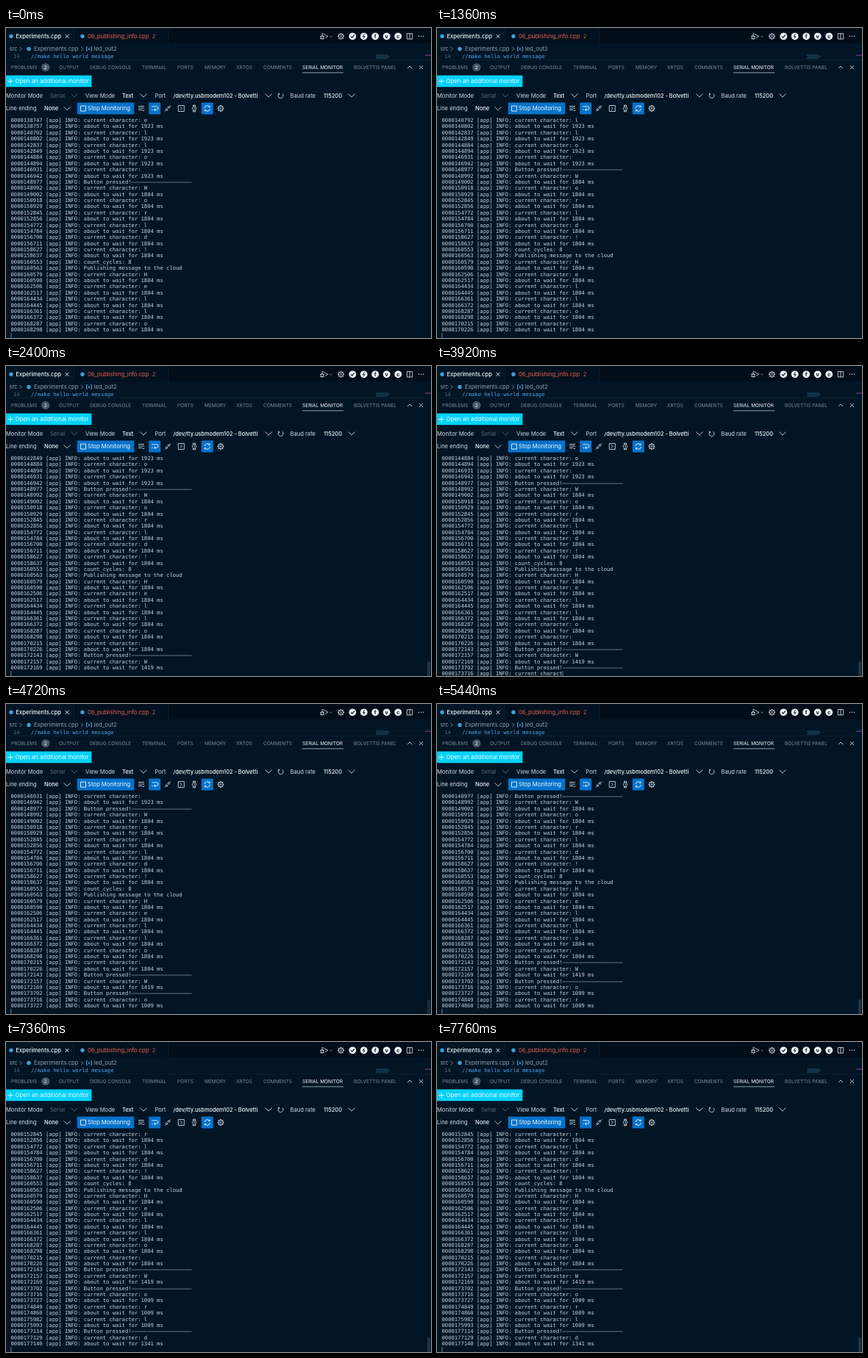
These frames come from a looping animation (578x422 px, 8000 ms). An HTML page with a canvas:

```html
<!DOCTYPE html>
<html lang="en">
<head>
<meta charset="utf-8">
<title>Serial monitor</title>
<style>
html, body { margin: 0; width: 100%; height: 100%; overflow: hidden; background: #011525; }
canvas { display: block; width: 578px; height: 422px; }
</style>
</head>
<body>
<canvas id="stage"></canvas>
<script>
const W = 578, H = 422, LOOP = 8000;
const UI = 'Inter, "Open Sans", sans-serif';
const MONO = '"DejaVu Sans Mono", "Liberation Mono", monospace';
const BG = '#011525', FG = '#d0d8e2', DIM = '#7c8a98', WHITE = '#f4f8fb';
const BLUE = '#0672ca', ICON_BLUE = '#3f9fd8';

const canvas = document.getElementById('stage');
const ctx = canvas.getContext('2d');
const ratio = window.devicePixelRatio || 1;
canvas.width = W * ratio;
canvas.height = H * ratio;
ctx.scale(ratio, ratio);

// Log entries: time, kind (c char, w wait, b button, n cycles, p publish), value
const LOG = `138747ce 138757w1923 140792cl 140802w1923 142837cl 142849w1923
144884co 144894w1923 146931c 146942w1923 148977b 148992cW 149002w1804 150918co
150929w1804 152845cr 152856w1804 154772cl 154784w1804 156700cd 156711w1804
158627c! 158637w1804 160553n8 160563p 160579cH 160590w1804 162506ce 162517w1804
164434cl 164445w1804 166361cl 166372w1804 168287co 168298w1804 170215c
170226w1804 172143b 172157cW 172169w1419 173702b 173716co 173727w1009 174849cr
174860w1009 175982cl 175993w1009 177114b 177129cd 177140w1341`
  .split(/\s+/).map(formatEntry);

function formatEntry(entry) {
  const [, time, kind, value] = entry.match(/^(\d+)(.)(.*)$/);
  const message = {
    c: 'current character: ' + value,
    w: 'about to wait for ' + value + ' ms',
    b: 'Button pressed!' + '–'.repeat(19),
    n: 'count_cycles: ' + value,
    p: 'Publishing message to the cloud'
  }[kind];
  return '0000' + time + ' [app] INFO: ' + message;
}

// Finished lines from each moment on, plus typed characters of the next one
const STEPS = [
  { at: 0, lines: 35 },
  { at: 400, lines: 37 },
  { at: 2320, lines: 40 },
  { at: 3920, lines: 41, typed: 38 },
  { at: 4000, lines: 43 },
  { at: 5040, lines: 45 },
  { at: 6160, lines: 47 },
  { at: 7360, lines: 50 }
];
const ROWS = 35, ROW_H = 8.38, LOG_X = 6.5, LOG_Y = 128.1;

function text(str, x, y, size, color, weight = 400, family = UI) {
  ctx.font = `${weight} ${size}px ${family}`;
  ctx.fillStyle = color;
  ctx.fillText(str, x, y);
}

function rect(x, y, w, h, color, r = 0) {
  ctx.fillStyle = color;
  ctx.beginPath();
  ctx.roundRect(x, y, w, h, r);
  ctx.fill();
}

function dot(x, y, r, color) {
  ctx.fillStyle = color;
  ctx.beginPath();
  ctx.arc(x, y, r, 0, 2 * Math.PI);
  ctx.fill();
}

function stroke(path, x, y, color = FG, width = 0.9) {
  ctx.save();
  ctx.translate(x, y);
  ctx.strokeStyle = color;
  ctx.lineWidth = width;
  ctx.stroke(new Path2D(path));
  ctx.restore();
}

const CHEVRON_DOWN = 'M-4.5-2.2L0 2.3L4.5-2.2';
const CHEVRON_RIGHT = 'M-1.3-2.6L1.3 0L-1.3 2.6';
const CROSS = 'M-2.5-2.5L2.5 2.5M2.5-2.5L-2.5 2.5';

function gear(x, y) {
  let teeth = '';
  for (let i = 0; i < 8; i++) {
    const c = Math.cos(i * Math.PI / 4), s = Math.sin(i * Math.PI / 4);
    teeth += `M${c * 3} ${s * 3}L${c * 4.4} ${s * 4.4}`;
  }
  stroke(teeth, x, y, FG, 1.5);
  stroke('M3.1 0A3.1 3.1 0 1 1 3.1-.01M1.1 0A1.1 1.1 0 1 1 1.1-.01', x, y);
}

function drawEditor() {
  rect(0, 0, W, 21, '#010e1a');
  rect(92, 0, 129, 21, '#01111f');
  rect(0, 0, 92, 21, BG);
  rect(92, 0, 0.8, 21, '#0a2233');
  rect(220, 0, 0.8, 21, '#0a2233');

  dot(7, 11.3, 2.7, ICON_BLUE);
  text('Experiments.cpp', 13.5, 14, 7.6, WHITE, 500);
  stroke(CROSS, 83, 11.3, WHITE);
  dot(104, 11.3, 2.7, ICON_BLUE);
  text('06_publishing_info.cpp', 111, 14, 7.65, '#e8604e');
  text('2', 199, 14, 7, '#e8604e');

  stroke('M-2-4.2L6 0L2 2.2M-2-4.2V-.5M-5 0H1M-5 3H1M-4 1.5A2 2.4 0 1 0 0 1.5A2 2.4 0 1 0-4 1.5', 432, 11.3, FG, 0.8);
  stroke('M-1.5-.8L0 .8L1.5-.8', 442, 11.5, DIM);
  gear(455.5, 11.3);
  for (const x of [471.3, 486.7, 502.2, 517.7, 533.2]) dot(x, 11.3, 4.9, '#edf2f5');
  stroke('M-2.3 0L-.6 1.8L2.4-1.8', 471.3, 11.3, BG, 1.2);
  stroke('M.8-3L-1.4.4H1.4L-.8 3', 486.7, 11.3, BG, 1);
  ctx.textAlign = 'center';
  text('f', 502.2, 13.9, 7, BG, 700);
  text('v', 517.7, 13.6, 7, BG, 700);
  text('c', 533.2, 13.6, 7, BG, 700);
  ctx.textAlign = 'left';
  stroke('M-3.7-3.7H3.7V3.7H-3.7ZM0-3.7V3.7', 549, 11.3);
  for (const x of [561.5, 564.5, 567.5]) dot(x, 11.3, 0.75, FG);

  const crumb = '#91a0ae';
  text('src', 4.5, 31, 7.6, crumb);
  stroke(CHEVRON_RIGHT, 20, 28.5, crumb, 0.8);
  dot(31, 28.5, 2.7, ICON_BLUE);
  text('Experiments.cpp', 38, 31, 7.6, crumb);
  stroke(CHEVRON_RIGHT, 103.5, 28.5, crumb, 0.8);
  stroke('M-2-2.7H-3.5V2.7H-2M2-2.7H3.5V2.7H2M-1.5-.7H1.5M-1.5 1H1.5', 113, 28.5, '#66a9d9', 0.9);
  text('led_out2', 119.5, 31, 7.8, crumb);

  text('14', 10, 40.5, 7.2, '#536b7e', 400, MONO);
  text('//make hello world message', 34, 40.5, 7.2, '#50a6f0', 400, MONO);
  rect(503, 36.5, 17, 1, '#28506c');
  rect(504, 38.5, 18, 1, '#214a66');
  rect(503, 40.5, 16, 1, '#28506c');
  rect(570, 36.5, 8, 1.2, '#763c83');
}

function drawPanelTabs() {
  rect(0, 43, W, H - 43, BG);
  rect(0, 43, W, 0.7, '#0b2537');
  const tabs = {
    PROBLEMS: 7, OUTPUT: 72, 'DEBUG CONSOLE': 114, TERMINAL: 185, PORTS: 233,
    MEMORY: 270, XRTOS: 313, COMMENTS: 350, 'SERIAL MONITOR': 403, 'BOLVETTIS PANEL': 473
  };
  for (const name in tabs) {
    text(name, tabs[name], 56, 6.55, name === 'SERIAL MONITOR' ? WHITE : DIM);
  }
  dot(53.8, 53.5, 5.6, '#465968');
  text('2', 51.8, 56, 6.6, WHITE);
  rect(403, 60.4, 56, 0.9, '#c4ced8');
  stroke('M-3 1.5L0-1.5L3 1.5', 549, 53.5);
  stroke(CROSS, 564.5, 53.5);
}

function drawControls() {
  rect(0, 64.5, 116.4, 15.8, '#00d2f8');
  stroke('M-3.7 0H3.7M0-3.7V3.7', 6, 72.5, WHITE);
  text('Open an additional monitor', 12.5, 75.3, 7.85, WHITE);

  text('Monitor Mode', 0, 94.6, 7.6, FG);
  text('Serial', 60, 94.6, 7.6, '#596978');
  stroke(CHEVRON_DOWN, 93, 91.8, '#596978');
  text('View Mode', 108, 94.6, 7.6, FG);
  text('Text', 158, 94.6, 7.5, WHITE, 500);
  stroke(CHEVRON_DOWN, 187, 91.8);
  text('Port', 202.5, 94.6, 7.6, FG);
  text('/dev/tty.usbmodem102 - Bolvetti', 227.5, 94.6, 7.4, WHITE, 500);
  stroke(CHEVRON_DOWN, 357, 91.8);
  stroke('M-2-2.8A3.5 3.5 0 1 0 2.4-2.6M-2-2.8H-3.6M-2-2.8V-.9', 373.5, 92);
  text('Baud rate', 386.5, 94.6, 7.6, FG);
  text('115200', 432, 94.6, 7.5, WHITE, 500);
  stroke(CHEVRON_DOWN, 470, 91.8);

  text('Line ending', 0, 112.2, 7.6, FG);
  text('None', 52, 112.2, 7.5, WHITE, 500);
  stroke(CHEVRON_DOWN, 83, 109.5);
  rect(96.7, 101.6, 77.6, 15.8, BLUE, 1);
  stroke('M-3.5-3.5H3.5V3.5H-3.5Z', 105, 109.6, WHITE);
  text('Stop Monitoring', 111, 112.3, 7.7, WHITE);

  stroke('M-4-3H4M-4-.5H4M-4 2H1M1.5 2L3 3.5L4.5 2', 184, 109.5);
  rect(194.2, 101.6, 16, 15.8, BLUE, 1);
  stroke('M-4-2.5H2.5A2 2 0 0 1 2.5 2H-1M1 .2L-1 2L1 3.8M-4 2H-2.5', 202.3, 109.3, WHITE);
  stroke('M-4 4L-2 2M4-4L2-2M-1.7-.2L.2 1.7L-1 2.6Q-2.4 3-2.8 1ZM-.2-1.7L1.7.2L2.8-1Q2.4-3 1-2.6Z', 220, 109.5);
  stroke('M-4-4H4V4H-4ZM-1.2-2L1 0L-1.2 2', 238.3, 109.5);
  stroke('M2.7 0A2.7 2.7 0 1 1 2.7-.01M-1.5-2.4V-4.4H1.5V-2.4M-1.5 2.4V4.4H1.5V2.4M0-1.4V.2H1.2', 256, 109.5);
  rect(265.8, 101.6, 16, 15.8, BLUE, 1);
  stroke('M-3.6-.4A3.6 3.6 0 0 1 3-2.2M3.4-4V-2H1.4M3.6.4A3.6 3.6 0 0 1-3 2.2M-3.4 4V2H-1.4', 273.8, 109.5, WHITE);
  gear(292, 109.5);
}

function drawLog(t) {
  const step = STEPS.filter(s => s.at <= t).pop();
  const typed = step.typed ? LOG[step.lines].slice(0, step.typed) : '';
  const shown = [...LOG.slice(step.lines - ROWS, step.lines), typed];
  shown.forEach((line, i) => text(line, LOG_X, LOG_Y + i * ROW_H, 7.185, '#cbd4de', 400, MONO));
  const caretX = LOG_X + ctx.measureText(typed).width;
  rect(caretX, 415, 0.8, 7, '#8c99a5');

  // The scrollbar shows after new output, then fades
  const age = t - step.at;
  const alpha = step.at ? Math.max(0, Math.min(1, (840 - age) / 160)) : 0;
  ctx.globalAlpha = alpha;
  rect(573, 402.5, 4, 19.5, '#1e3546');
  ctx.globalAlpha = 1;
}

function draw(now) {
  const t = now % LOOP;
  ctx.fillStyle = BG;
  ctx.fillRect(0, 0, W, H);
  drawEditor();
  drawPanelTabs();
  drawControls();
  drawLog(t);
}

const start = performance.now();
function tick() {
  draw(performance.now() - start);
  requestAnimationFrame(tick);
}
tick();
</script>
</body>
</html>
```
